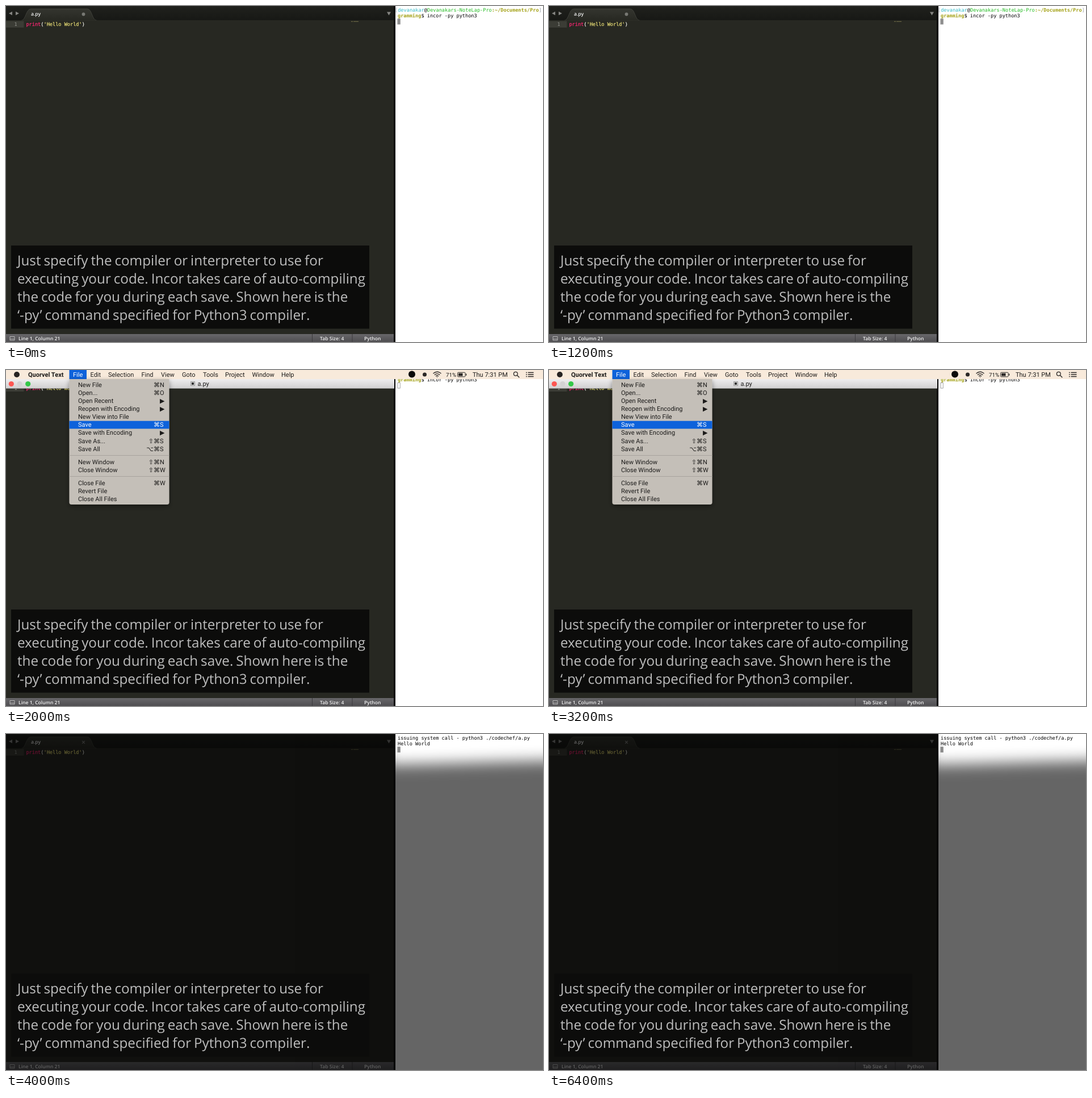
Recreate the animation shown at these times as an HTML page. Size 946 by 592 pixels, loop 8 s.

```html
<!DOCTYPE html>
<html lang="en">
<head>
<meta charset="utf-8">
<title>Saving runs the code</title>
<style>
  html, body { margin: 0; width: 100%; height: 100%; overflow: hidden; background: #fff; }
  svg { display: block; width: 946px; height: 592px; }
  text { white-space: pre; text-rendering: geometricPrecision; }
  .mono { font: 8.6px "DejaVu Sans Mono", monospace; }
  .code { fill: currentColor; stroke: currentColor; stroke-width: .25px; }
  .bold { font-weight: bold; }
  .status { font: 600 8.6px "Open Sans", sans-serif; fill: #f2f2f2; }
  .ui { font: 11px Roboto, sans-serif; fill: #1b1a19; }
  .keys { font: 11px "DejaVu Sans", sans-serif; text-anchor: end; }
  .caption { font: 24.25px "Open Sans", sans-serif; word-spacing: -1.4px; fill: #bdbdbd; }
</style>
</head>
<body>
<svg viewBox="0 0 946 592">
  <defs>
    <linearGradient id="tabbar" x2="0" y2="1">
      <stop stop-color="#20211d"/><stop offset="1" stop-color="#171815"/>
    </linearGradient>
    <linearGradient id="tab" x2="0" y2="1">
      <stop stop-color="#34352f"/><stop offset="1" stop-color="#272822"/>
    </linearGradient>
    <linearGradient id="statusbar" x2="0" y2="1">
      <stop stop-color="#68676a"/><stop offset="1" stop-color="#4f4e51"/>
    </linearGradient>
    <linearGradient id="titlebar" x2="0" y2="1">
      <stop stop-color="#eeedee"/><stop offset="1" stop-color="#d0cfd0"/>
    </linearGradient>
    <filter id="blur" x="-20%" y="-60%" width="140%" height="220%"><feGaussianBlur stdDeviation="13"/></filter>
    <filter id="shadow" x="-10%" y="-10%" width="120%" height="120%">
      <feDropShadow dx="0" dy="3" stdDeviation="4" flood-opacity=".4"/>
    </filter>
    <mask id="spotlight" maskUnits="userSpaceOnUse" x="686" y="0" width="260" height="592">
      <path d="M686 0h260v592h-260z" fill="#fff"/>
      <path d="M668 -60H1000V46Q860 49 800 51T668 54Z" filter="url(#blur)"/>
    </mask>
  </defs>

  <g id="editor">
    <path d="M0 0h686v592H0z" fill="#000"/>
    <path d="M0 0h683v592H0z" fill="#272822"/>
    <path d="M0 0h683v25H0z" fill="url(#tabbar)"/>
    <path d="M27 25.5C35 25 35 5 44 5H143C152 5 151 25 160 25.5Z" fill="url(#tab)" stroke="#484942" stroke-width=".7"/>
    <path d="M0 25.3H683V27H0z" fill="#272822"/>
    <path d="M5 13l6-3.3v6.6zM23 13l-6-3.3v6.6zM671 10.5h7l-3.5 6z" fill="#858582"/>
    <text x="44" y="17.3" class="status">a.py</text>
    <circle id="unsaved" cx="136.5" cy="14.5" r="2.9" fill="#777873"/>
    <path id="saved" d="M134.2 12.2l4.6 4.6m0-4.6l-4.6 4.6" stroke="#858582" stroke-width="1.2"/>
    <path d="M0 26.5h31.5v11.5H0z" fill="#3b3c35"/>
    <path d="M608 27.3h3m1 0h9" stroke="#8c8656" stroke-width=".8"/>
    <text x="14.6" y="35.3" class="mono" fill="#90918b">1</text>
    <text x="35.4" y="35.3" class="mono code" color="#f8f8f2"><tspan class="code" color="#f92672">print</tspan>(<tspan class="code" color="#e6db74">'Hello World'</tspan>)</text>
    <path d="M0 578h683v14H0z" fill="url(#statusbar)"/>
    <path d="M539.5 578v14M610 578v14" stroke="#3c3b3e"/>
    <path d="M7 582.5h8v6.5H7zM7 586.8h8" fill="none" stroke="#d0d0d0" stroke-width=".8"/>
    <g class="status">
      <text x="22" y="588.5">Line 1, Column 21</text>
      <text x="553" y="588.5">Tab Size: 4</text>
      <text x="631" y="588.5">Python</text>
    </g>
  </g>

  <g id="prompt" class="mono">
    <text x="685" y="9.7" fill="#9aa0aa">[<tspan fill="#33bbc8">devanakar</tspan><tspan fill="#000">@</tspan><tspan fill="#25bc24">Devanakars-NoteLap-Pro</tspan><tspan class="bold" fill="#a3a116">:~/Documents/Pro</tspan>]</text>
    <text x="690" y="20"><tspan class="bold" fill="#a3a116">gramming</tspan>$ incor -py python3</text>
  </g>
  <g id="output" class="mono">
    <text x="690" y="9.7">issuing system call - python3 ./codechef/a.py</text>
    <text x="690" y="20">Hello World</text>
  </g>
  <path id="block" d="M689.5 22.3h5.3v10.2h-5.3z" fill="#8e8e8e"/>

  <g id="desktop">
    <path d="M690 22.5h4.3v9.6h-4.3z" fill="#fff" stroke="#8e8e8e" stroke-width=".8"/>
    <path d="M0 16h684v16.5H0z" fill="url(#titlebar)"/>
    <path d="M0 32.5h684" stroke="#8f8f8f" stroke-width=".6"/>
    <circle cx="9.3" cy="24.5" r="4.6" fill="#fc5753"/>
    <circle cx="24" cy="24.5" r="4.6" fill="#d3d2d3"/>
    <circle cx="38.7" cy="24.5" r="4.6" fill="#33c748"/>
    <path d="M325.5 20.5h7v7h-7z" fill="#ddd" stroke="#777" stroke-width=".7"/>
    <path d="M327 22h4v4h-4z" fill="#333"/>
    <text x="337.5" y="28.3" class="ui">a.py</text>
    <path d="M0 0h946v16H0z" fill="#f8eadb"/>
    <path d="M111.5 0h30.5v16h-30.5z" fill="#0d62db"/>
    <circle cx="19" cy="8" r="5" fill="#262322"/>
    <circle cx="715" cy="7.5" r="6" fill="#0b0b0b"/>
    <circle cx="737.5" cy="8" r="3.5" fill="#2b2827"/>
    <g fill="none" stroke="#2b2827" stroke-width="1.3">
      <path d="M752.5 6.3q7-6.2 14 0M754.8 8.7q4.7-4.2 9.4 0M757.1 11q2.4-2 4.8 0"/>
      <rect x="795.5" y="4.3" width="13.5" height="7.6" rx="1.2" stroke-width="1"/>
      <circle cx="897.8" cy="6.8" r="3.4"/><path d="M900.3 9.3l4 4M919.5 4.5h10M919.5 8h10M919.5 11.5h10M916 4.5h1.7M916 8h1.7M916 11.5h1.7"/>
    </g>
    <path d="M797 5.8h7.5v4.6H797zM810 6.5h1.3v3.2H810zM758.5 12.2h2l-1 1.3z" fill="#2b2827"/>
    <g id="menubar" class="ui">
      <text x="39" y="12" class="bold">Quorvel Text</text>
      <text x="775" y="11.7" style="font-size:9.7px">71%</text>
      <text x="822" y="12">Thu 7:31 PM</text>
    </g>
    <path d="M111.5 16H287.5V233q0 4-4 4H115.5q-4 0-4-4Z" fill="#c4bfb8" filter="url(#shadow)"/>
    <path d="M111.5 89.8h176v13.8h-176z" fill="#0d62db"/>
    <path d="M111.5 150.5h176M111.5 187.5h176" stroke="#a8a39d"/>
    <g id="menu" class="ui"></g>
  </g>

  <g id="dim" opacity=".6">
    <path d="M0 0h686v592H0z"/>
    <path d="M686 0h260v592h-260z" mask="url(#spotlight)"/>
  </g>

  <path d="M9 422h631v146.5H9z" fill="#0c0c0b"/>
  <g id="caption" class="caption"></g>
</svg>
<script>
const $ = id => document.getElementById(id);

function addText(parent, x, y, content, className = '', fill = '') {
  const node = document.createElementNS('http://www.w3.org/2000/svg', 'text');
  node.setAttribute('x', x);
  node.setAttribute('y', y);
  node.setAttribute('class', className);
  node.style.fill = fill;
  node.textContent = content;
  $(parent).append(node);
}

[
  'Just specify the compiler or interpreter to use for',
  'executing your code. Incor takes care of auto-compiling',
  'the code for you during each save. Shown here is the',
  '‘-py’\u2009command specified for Python3 compiler.'
].forEach((line, i) => addText('caption', 20, 456.7 + i * 32, line));

const titles = { File: 118, Edit: 148.5, Selection: 180, Find: 238.5, View: 273, Goto: 310,
  Tools: 347, Project: 386, Window: 433.5, Help: 485 };
for (const [title, x] of Object.entries(titles))
  addText('menubar', x, 12, title, '', title === 'File' ? '#fff' : '');

// Each entry is "label|shortcut"; an empty entry is a separator.
const entries = ['New File|⌘N', 'Open...|⌘O', 'Open Recent|▶', 'Reopen with Encoding|▶',
  'New View into File', 'Save|⌘S', 'Save with Encoding|▶', 'Save As...|⇧⌘S', 'Save All|⌥⌘S', '',
  'New Window|⇧⌘N', 'Close Window|⇧⌘W', '', 'Close File|⌘W', 'Revert File', 'Close All Files'];
let y = 29.8;
for (const entry of entries) {
  if (!entry) { y += 8.8; continue; }
  const [label, keys = ''] = entry.split('|');
  const fill = label === 'Save' ? '#fff' : '';
  addText('menu', 127, y, label, '', fill);
  if (keys === '▶') addText('menu', 279.5, y, keys, 'keys', fill);
  else if (keys) {
    addText('menu', 271, y, keys.slice(0, -1), 'keys', fill);
    addText('menu', 271, y, keys.slice(-1), '', fill);
  }
  y += 14.1;
}

const show = (id, visible) => $(id).style.display = visible ? '' : 'none';

function draw(now) {
  const time = now % 8000;
  const saving = time >= 2000 && time < 4000;
  const done = time >= 4000;
  show('unsaved', !done);
  show('saved', done);
  show('prompt', !done);
  show('output', done);
  show('block', !saving);
  show('desktop', saving);
  show('dim', done);
}

const start = performance.now();
function tick() {
  draw(performance.now() - start);
  requestAnimationFrame(tick);
}
tick();
</script>
</body>
</html>
```
